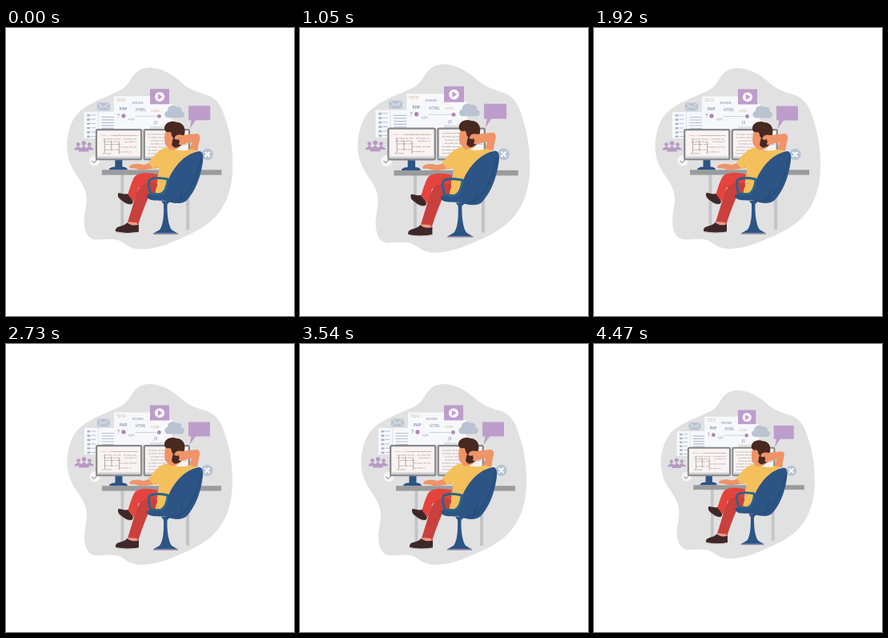
Animation of 360 by 360 pixels, one loop 4500 ms. Source, as an HTML page:

```html
<!DOCTYPE html>
<html lang="en">
<head>
<meta charset="utf-8">
<title>Pulsing desk scene</title>
<style>
  html, body { margin: 0; width: 100%; height: 100%; overflow: hidden; background: #fff; }
  svg { display: block; width: 100vw; height: 100vh; }
  text { font: bold 4.6px "Open Sans", sans-serif; fill: #a3a8c0; }
  .orange { fill: #e6c8b0; }
  .line { fill: none; stroke-linecap: round; stroke-linejoin: round; }
  .skin { fill: #ef9468; }
  .blue { fill: #2c5485; }
  .lilac { fill: #bd9dcb; }
  .steel { fill: #b9c3d2; }
  .hair { fill: #47291f; }
  .shoe { fill: #3e2729; }
  .page { fill: #f7f8fc; }
</style>
</head>
<body>
<svg viewBox="0 0 360 360">
  <g id="scene">
    <path fill="#e1e1e1" d="M180 50C197 51 210 60 220 69C231 79 243 81 254 85C268 92 271 105 274 114C280 132 283 150 283 172C283 203 273 229 251 245C236 256 220 262 203 269C190 274 177 276 168 276C152 275 149 268 141 265C131 262 118 265 110 264C101 262 98 251 98 241C98 228 103 219 100 206C96 188 80 180 77 155C75 138 80 116 92 105C104 94 121 88 137 81C153 75 154 66 161 58C166 52 173 50 180 50Z"/>

    <!-- floating cards -->
    <rect class="page" x="98" y="105" width="17" height="33"/>
    <rect class="page" x="116" y="105" width="23" height="33"/>
    <path class="line" stroke="#a9b8d0" stroke-width="4" stroke-dasharray="2.6 2.7" style="stroke-linecap:butt" d="M103.5 108V137"/>
    <path class="line" stroke="#b4bfd2" stroke-width="1" d="M107 109h5M107 114.3h5M107 119.6h5M107 125h5M107 130.2h5M107 135.5h5"/>
    <path class="line" stroke="#b4bfd2" stroke-width="1.2" d="M120 111.5h17M120 115h17M120 118.5h17M120 122h17M120 125.5h17"/>
    <rect class="steel" x="114" y="93.5" width="16" height="10"/>
    <path class="line" stroke="#eef1f7" stroke-width=".9" d="M114.5 94l7.5 5.5l7.5-5.5M114.5 103l5-5M129.5 103l-5-5"/>
    <rect class="page" x="135" y="85.5" width="45" height="41"/>
    <rect class="page" x="153" y="95" width="55" height="28"/>
    <text class="orange" x="138" y="92">TECH</text>
    <text x="157.5" y="95.2" style="font-size:3.8px">DESIGN</text>
    <text x="142" y="103.3" style="fill:#8f93b0">PHP</text>
    <text x="162" y="104.3">HTML</text>
    <text class="orange" x="181" y="104.8" style="font-size:4px">CODE</text>
    <text x="139" y="112.5" style="font-size:7px">?</text>
    <text x="152.5" y="116" style="font-size:5.4px">&lt;/&gt;</text>
    <text x="185" y="120.5" style="font-size:5px">JS</text>
    <path class="line" stroke="#cfd2df" stroke-width="1" d="M162 110.5h30"/>
    <circle cx="147" cy="110" r="2.6" fill="#ad87b7"/>
    <circle cx="191.5" cy="110.5" r="2.4" fill="#ad87b7"/>
    <rect class="lilac" x="180" y="76.5" width="24" height="19"/>
    <circle cx="192" cy="86.3" r="6.1" fill="#f7f4fa"/>
    <path class="lilac" d="M190 82.8L195.5 86.3L190 89.8Z"/>
    <path class="steel" d="M203 112.5C197 112.5 197 104.5 202 104C201 98 209 95 213 99C217 97.5 220.5 101 219.5 104.5C224.5 105 224 112.5 219 112.5Z"/>
    <path class="lilac" d="M228 97.5H255V115.5H237L229.5 126L231.5 115.5H228Z"/>
    <circle class="steel" cx="251.5" cy="158" r="7.2"/>
    <path class="line" stroke="#fff" stroke-width="1.9" d="M249 155.5l5 5m0-5l-5 5"/>
    <circle cx="111" cy="166" r="6.5" fill="#f7f7f7"/>
    <path class="line" stroke="#a5a9b0" stroke-width="1.3" d="M107.8 166.2l2.4 2.4l4.2-4.6"/>
    <g fill="#b799c2">
      <circle cx="90.5" cy="145.5" r="2.3"/>
      <circle cx="104.5" cy="145.5" r="2.3"/>
      <path d="M85.5 152.5C86 149 89 150 90.500 147C92 150 95 149 95.500 152.500ZM99.500 152.500C100 149 103 150 104.500 147C106 150 109.500 149 110 152.500Z"/>
      <circle cx="97.5" cy="144" r="2.7"/>
      <path d="M91 154.500C92 149.500 96 151 97.500 146C99 151 103 149.500 104 154.500Z"/>
    </g>

    <!-- desk and monitors -->
    <path fill="#c3c4c9" d="M143.5 183h3.8v72h-3.8ZM225 183h4v69h-4Z"/>
    <path class="blue" d="M136.500 164h9v9.500c3 0 6.500 1 6.500 4h-23c0-3 4-4 7.500-4Z"/>
    <g fill="#f9f3f2" stroke="#87888b" stroke-width="2.2">
      <rect x="172.8" y="127.2" width="56" height="37" rx="1.5"/>
      <rect x="113.2" y="127.2" width="56" height="37" rx="1.5"/>
    </g>
    <path fill="#d0d0d3" d="M114.300 160.500h53.800v2.800h-53.800ZM173.900 160.500h53.800v2.800h-53.800Z"/>
    <path class="line" stroke="#e9c9c1" stroke-width=".9" stroke-dasharray="7 3 12 2" d="M119 134.500h45"/>
    <g class="line" stroke="#bcb3b4" stroke-width=".9" stroke-dasharray="3 1.5 6 2">
      <path d="M134 134.5h30M122 139h21M147 139h16M122 142.3h20M149 142.3h14M125 145.6h18M142 149h21M124 152.3h18M142 155h14M121 157h12"/>
      <path d="M178 133h22M178 137h20M181 141h18M181 145h18M178 149h22M178 153h20M178 157h24M222 140h6M222 146h6"/>
    </g>
    <path class="line" stroke="#a59697" stroke-width=".8" d="M123.500 139v17M132 141v12M141.500 143v14"/>
    <rect x="120" y="177.3" width="149" height="6.3" fill="#9b9b9d"/>

    <!-- legs and shoes -->
    <path fill="#ef9a85" d="M153 206l6-2l-1 11l-5 0Z"/>
    <path class="shoe" d="M140.500 206C145 206.500 149 208.500 154 206.500L159 217C158.500 221 153 221.500 148 218C143 215 138.500 211 140.500 206Z"/>
    <path class="line" stroke="#d9cfcd" stroke-width=".8" d="M140.500 212C146 217 151 221 157 220.500"/>
    <path fill="#e4443d" d="M190 183C178 180 164 180 160 187C156 195 154 203 152.500 208L160 217L166 199L187 210Z"/>
    <path fill="#c9403d" d="M188 194C174 190 165 197 161.500 212L152 243L165.500 245C169 234 174 220 180 207L196 209Z"/>
    <path fill="#ef9a85" d="M153 242l11 1l-1 5h-11Z"/>
    <path class="shoe" d="M137 252C138.500 246.500 146 249 151.500 243C156 247 162 247 166 245V254.500C160 256 142 257 137 254Z"/>
    <path class="line" stroke="#c9b8b4" stroke-width="1" d="M137.500 254.500C145 256.500 158 256.500 165.500 255"/>

    <!-- head, torso and arms -->
    <path class="skin" d="M186 167L172 171C164 169 158 169 154 173L155 175.5C162 174.5 165 178 172 177.5L190 175Z"/>
    <path fill="#f4c05c" d="M203 149C193 150 187 157 178 168L184 176L190 173C192 180 190 185 189 189C191 198 186 201 187 206L214 208L240 160L234 150C224 155 213 154 203 149Z"/>
    <path class="skin" d="M199.500 129C198 136 197 145 201 148L205 152C211 153 216 151 218 147L220 130Z"/>
    <path class="hair" d="M198 127C197 119 206 115 213 118C221 118 225 125 223 133L220 146C215 150 209 150 207 146L209 137C206 136 208 132 205 130C202 131 199 130 198 127Z"/>
    <path class="skin" d="M211 141C209 136 214 132 220 134L238 132C243 132 243 138 241 143L239 154L229 151L232 143C224 144 220 147 217 146C214 145 217 141 216 139Z"/>
    <path class="hair" d="M208 140C211 138 215 140 217 142L214 149C210 151 207 148 208 140Z"/>

    <!-- chair -->
    <path class="blue" d="M241 154C247 154 247 162 245 172C242 189 236 204 226 215C220 221 207 219 201 216C192 215 177 217 176 210C177 206 187 207 197 207C198 200 200 194 204 187C211 172 224 157 241 154Z"/>
    <path class="line" stroke="#244873" stroke-width="1" d="M244.500 162C240 183 231 200 223 210C216 216 208 217 201 216M221 202L216 217"/>
    <path class="line" stroke="#28658a" stroke-width="3" d="M181 207C179 202 177 192 180 189.5C185 186.5 197 188 202 189C202 198 198 208 190 208Z"/>
    <path class="blue" d="M194 216h12l-4.500 4C201 233 203 247 207 252L214.500 256.500H184L192 252C196.500 246 197.500 234 197 220Z"/>
    <path fill="#8b87a4" d="M184 256h31v1.800h-31Z"/>
  </g>
</svg>
<script>
  const LOOP = 4500, BEAT = 810, STEP = 30;
  const PEAK = 120, FALL = 555, RISE = BEAT - FALL;
  const LOW = 0.854, HIGH = 1.137;
  const CX = 180, CY = 163.3;
  const scene = document.getElementById('scene');

  // Decelerating fall from the peak, then a quick even rise.
  function scaleAt(ms) {
    const p = (ms - PEAK + BEAT) % BEAT;
    const k = p < FALL ? (1 - p / FALL) ** 1.68 : (p - FALL) / RISE;
    return LOW + (HIGH - LOW) * k;
  }

  const start = performance.now();
  function draw() {
    const t = (performance.now() - start) % LOOP;
    const s = scaleAt(Math.floor(t / STEP) * STEP);
    scene.setAttribute('transform', `translate(${CX} ${CY}) scale(${s}) translate(${-CX} ${-CY})`);
    requestAnimationFrame(draw);
  }
  draw();
</script>
</body>
</html>
```
